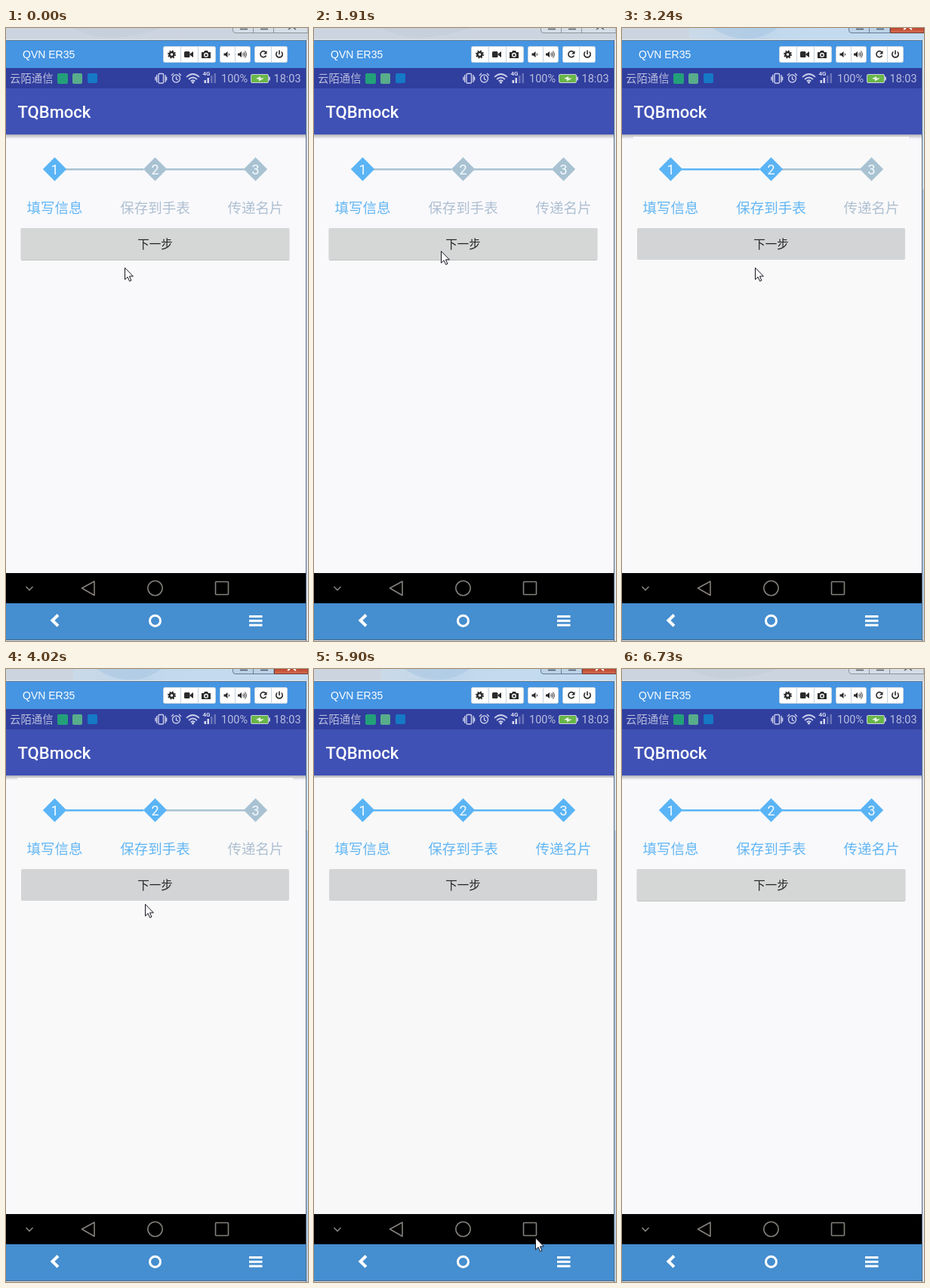
Write an HTML page that moves like this. It is 400 px wide and 812 px high and loops after 6.76 s.

```html
<!DOCTYPE html>
<html lang="zh">
<head>
<meta charset="utf-8">
<title>Step view</title>
<style>
html, body { margin: 0; width: 100%; height: 100%; overflow: hidden; background: #d0d9e4; }
svg { display: block; width: 100vw; height: 100vh; }
text { font-family: Roboto, "Noto Sans CJK SC", "Noto Sans CJK", sans-serif; }
.mid { text-anchor: middle; }
.line { fill: none; stroke: currentColor; }

/* every animation holds each pose until the next key */
.active, .flat, .plain, .step2, .step3, .lift, .press, .hover, #cursor {
  animation: 6760ms step-end infinite;
}
.active { animation-name: active; }
.flat { animation-name: flat; }
.plain { animation-name: plain; }
.step2 { animation-name: step2; }
.step3 { animation-name: step3; }
.lift { animation-name: lift; }
.press { animation-name: press; }
.hover { animation-name: hover; }
#cursor { animation-name: cursor; }

@keyframes active { 0%, 99.55% { opacity: 0 } 32.39% { opacity: 1 } }
@keyframes flat { 0%, 75.59% { opacity: 0 } 36.39% { opacity: 1 } }
@keyframes plain { 0%, 99.55% { opacity: 0 } 75.59% { opacity: 1 } }
@keyframes step2 { 0% { color: #a9c2d2; fill: #aebfd1 } 36.39%, 100% { color: #5ab4f5; fill: #62b6f4 } }
@keyframes step3 { 0% { color: #a9c2d2; fill: #aebfd1 } 71.59%, 100% { color: #5ab4f5; fill: #62b6f4 } }
@keyframes lift { 0%, 99.55% { opacity: 1 } 36.39% { opacity: 0 } }
@keyframes press { 0%, 40.38%, 73.37% { opacity: 0 } 36.39%, 71.59% { opacity: 1 } }
@keyframes hover { 0%, 91.71% { opacity: 0 } 89.49% { opacity: 1 } }
@keyframes cursor {
  0% { transform: translate(157px, 317px) }
  13.75% { transform: translate(159px, 309px) }
  15.53% { transform: translate(162px, 301px) }
  17.75% { transform: translate(163px, 301px) }
  26.47% { transform: translate(166px, 298px) }
  28.25% { transform: translate(168px, 295px) }
  32.39% { transform: translate(167px, 305px) }
  34.17% { transform: translate(162px, 350px) }
  36.39% { transform: translate(161px, 370px) }
  43.93% { transform: translate(164px, 350px) }
  46.15% { transform: translate(170px, 335px) }
  47.92% { transform: translate(176px, 317px) }
  49.7% { transform: translate(180px, 302px) }
  51.47% { transform: translate(182px, 293px) }
  57.69% { transform: translate(184px, 300px) }
  59.46% { transform: translate(184px, 311px) }
  61.68% { transform: translate(184px, 345px) }
  63.46% { transform: translate(184px, 368px) }
  83.28% { transform: translate(200px, 425px) }
  85.05% { transform: translate(270px, 606px) }
  87.27% { transform: translate(293px, 753px) }
  89.49% { transform: translate(300px, 790px) }
  91.71%, 100% { transform: translate(300px, 840px) }
}
</style>
</head>
<body>
<svg viewBox="0 0 400 812" preserveAspectRatio="none">
<defs>
  <linearGradient id="glass" x2="0" y2="1"><stop stop-color="#ccd5df"/><stop offset="1" stop-color="#d5dee8"/></linearGradient>
  <linearGradient id="sky" x2="1" y2="0">
    <stop stop-color="#cbdae8"/><stop offset=".3" stop-color="#bfd5ea"/><stop offset=".42" stop-color="#c3daee"/>
    <stop offset="1" stop-color="#c3dbf0"/>
  </linearGradient>
  <linearGradient id="red" x2="0" y2="1"><stop stop-color="#b73d25"/><stop offset="1" stop-color="#d77055"/></linearGradient>
  <linearGradient id="shade" x2="0" y2="1"><stop stop-color="#b0b1b5"/><stop offset="1" stop-color="#f9f9fc"/></linearGradient>
  <path id="gem" d="M0-15.700L15.700 0 0 15.700-15.700 0Z"/>
</defs>

<!-- window frame -->
<rect width="400" height="812" fill="url(#glass)"/>
<path d="M88 0Q120 17 155 12T205 0Z" fill="#c4ced9" opacity=".6"/>
<g fill="#d5dde6" stroke="#8b959f">
  <path d="M300.500-1V3Q300.500 6.500 304 6.500H400V-1M327.500 0V6.500M354.500 0V6.500"/>
</g>
<path d="M310 1.500H320M337 1.500H347M374 2L377 0M384 2L381 0" stroke="#59616a" stroke-width="1.500"/>
<rect x="398" y="16" width="2" height="796" fill="#dbe3ec"/>
<g class="active">
  <rect x="89" width="311" height="15" fill="url(#sky)"/>
  <path d="M120 0Q140 14 164 14T206 0Z" fill="#9fc0df" opacity=".45"/>
  <path d="M300.500-1V3Q300.500 6.500 304 6.500H355V-1M327.500 0V6.500" fill="#bcd2e7" stroke="#667d95"/>
  <path d="M355.500-1V6.500H400V-1" fill="url(#red)" stroke="#6d3b35"/>
  <path d="M310 1.500H320M337 1.500H347" stroke="#4d5b6b" stroke-width="1.500"/>
  <path d="M373 2L376 0M384 2L381 0" stroke="#fff" stroke-width="2"/>
  <rect x="398" y="15" width="2" height="199" fill="#d2e3f2"/>
  <rect x="398" y="214" width="2" height="598" fill="#b4cde4"/>
</g>
<rect y="15" width="398" height="1" fill="#dfe7ef"/>
<rect y="16" width="398" height="1" fill="#5f7890"/>
<rect x="397" y="16" width="1" height="796" fill="#566b80"/>

<!-- mirror toolbar -->
<rect y="17" width="397" height="36" fill="#4595e3"/>
<text x="22" y="40" font-size="14" fill="#fff" style="font-family:'Liberation Sans',sans-serif">QVN ER35</text>
<g fill="#fff" stroke="#c6d3df">
  <rect x="208.500" y="24.500" width="69" height="21" rx="2"/>
  <rect x="283.500" y="24.500" width="40" height="21" rx="2"/>
  <rect x="329.500" y="24.500" width="43" height="21" rx="2"/>
  <path d="M231.500 25V45M254.500 25V45M303.500 25V45M351.500 25V45"/>
</g>
<g fill="#2b2b2b" color="#2b2b2b">
  <circle class="line" cx="219.500" cy="35" r="3" stroke-width="2.400"/>
  <circle class="line" cx="219.500" cy="35" r="4.600" stroke-width="1.800" stroke-dasharray="1.800 1.813"/>
  <rect x="236" y="31" width="7.500" height="8" rx="1.500"/>
  <path d="M243.500 34.500L248 31V39L243.500 35.500Z"/>
  <path d="M259 32H262L263 30H267L268 32H271V40H259Z"/>
  <circle class="line" cx="265" cy="35.800" r="2.300" style="color:#fff" stroke-width="1.300"/>
  <path d="M288.500 33.500H290.500L293.500 31V39L290.500 36.500H288.500ZM307 33.500H309L312 31V39L309 36.500H307Z"/>
  <path class="line" d="M295 33.500Q296.500 35 295 36.500M313.500 33.500Q315 35 313.500 36.500M315 32Q317.500 35 315 38M316.500 30.500Q320 35 316.500 39.500"/>
  <path class="line" d="M344 32A4 4 0 1 0 344.500 36.500" stroke-width="1.600"/>
  <path d="M345.500 30V34.500H341Z"/>
  <path class="line" d="M359.300 31.500A4.200 4.200 0 1 0 364.700 31.500M362 29.500V35" stroke-width="1.600"/>
</g>

<!-- phone status bar -->
<rect y="53" width="397" height="27" fill="#303e9e"/>
<g fill="#b9bfde" color="#c9cee9">
  <text x="5" y="72" font-size="14.400">云陌通信</text>
  <rect x="68" y="60" width="14" height="14" rx="2" fill="#23a079"/>
  <rect x="88" y="60" width="13" height="14" rx="2" fill="#58ad8b"/>
  <rect x="108" y="60" width="13" height="13" rx="2" fill="#1579c6"/>
  <g class="line" stroke-width="1.400">
    <rect x="202" y="60.500" width="6.500" height="12.500" rx="1"/>
    <path d="M199.700 62V72M211 62V72M198 64.500V69.500M212.600 64.500V69.500"/>
    <circle cx="225.500" cy="67" r="5"/>
    <path d="M225.500 64V67.500L228 69M219 63L222 60M232 63L229 60"/>
    <path d="M239 65Q247.500 57 256 65M242 68Q247.500 63 253 68M244.700 70.500Q247.500 68 250.300 70.500" stroke-width="1.700"/>
  </g>
  <circle cx="247.500" cy="72" r="1.600" fill="#c9cee9"/>
  <text x="260.500" y="63" font-size="8" font-weight="700" fill="#d5d9ee">4G</text>
  <path d="M262.500 69H265V73H262.500ZM266.500 66H269V73H266.500Z" fill="#d5d9ee"/>
  <path d="M271 63H273.500V73H271ZM275.500 60H278V73H275.500Z" fill="#6973b7"/>
  <text x="285" y="72" font-size="14.500">100%</text>
  <rect x="324.500" y="61.500" width="23" height="11" rx="1.500" fill="#69b649" stroke="#cbd0e4"/>
  <path d="M348 64.500H350V69.500H348Z"/>
  <path d="M331 67L337 64V66.500H342L335 70.500V68Z" fill="#e8f2e4"/>
  <text x="354.500" y="72" font-size="14.500">18:03</text>
</g>

<!-- app -->
<rect y="141" width="397" height="581" fill="#f9f9fc"/>
<rect y="141" width="397" height="6" fill="url(#shade)"/>
<g class="flat">
  <rect x="15" y="144" width="365" height="578" fill="#f9f9f9"/>
</g>
<g class="plain">
  <rect y="144" width="397" height="578" fill="#f8f8f8"/>
</g>
<rect y="80" width="397" height="61" fill="#3f51b5"/>
<text x="15.500" y="119" font-size="22" font-weight="500" fill="#fff">TQBmock</text>

<g stroke="currentColor" stroke-width="2.400">
  <path class="step2" d="M79 187.200H182"/>
  <path class="step3" d="M212 187.200H316"/>
</g>
<use href="#gem" x="64.500" y="187" fill="#5ab4f5"/>
<g class="step2"><use href="#gem" x="197.500" y="187" style="fill:currentColor"/></g>
<g class="step3"><use href="#gem" x="330.500" y="187" style="fill:currentColor"/></g>
<g class="mid" font-size="18" fill="#f6fbff">
  <text x="64.500" y="194">1</text><text x="197.500" y="194">2</text><text x="330.500" y="194">3</text>
</g>
<g class="mid" font-size="18.500">
  <text x="64.500" y="244.500" fill="#62b6f4">填写信息</text>
  <text class="step2" x="197.500" y="244.500">保存到手表</text>
  <text class="step3" x="330.500" y="244.500">传递名片</text>
</g>

<g class="lift">
  <rect x="19" y="265" width="357" height="42" rx="2" fill="#e3e4e6"/>
  <rect x="20" y="306" width="355" height="2" rx="1" fill="#c3c5c6"/>
</g>
<rect x="20" y="265" width="355" height="42" rx="2" fill="#d3d4d5"/>
<rect class="lift" x="20" y="265" width="355" height="42" rx="2" fill="#d5d7d6"/>
<rect class="press" x="19" y="265" width="357" height="44" rx="4" fill="#cfd0d1"/>
<text class="mid" x="197.500" y="292" font-size="15.500" font-weight="500" fill="#242525">下一步</text>

<!-- navigation -->
<rect y="722" width="397" height="40" fill="#000"/>
<g class="line" color="#85817d" stroke-width="1.600">
  <path d="M26.500 740L31 744.500 35.500 740"/>
  <path d="M100.500 742L117 733V751.500Z" stroke-linejoin="round"/>
  <circle cx="197.500" cy="742" r="9.700"/>
  <rect x="277.500" y="733.500" width="17" height="17" rx="1"/>
</g>
<rect y="762" width="397" height="48" fill="#458ecf"/>
<rect class="hover" x="264" y="762" width="133" height="48" fill="#5a9fdc"/>
<g class="line" color="#fff" stroke-width="3">
  <path d="M69 777.500L61.500 784.700 69 792" stroke-width="4"/>
  <circle cx="197.500" cy="785.200" r="7"/>
  <path d="M322 779.500H339.500M322 785.200H339.500M322 791H339.500"/>
</g>
<rect y="810" width="398" height="1" fill="#50677f"/>

<g id="cursor">
  <path d="M.5.700V16.200L4.100 12.800 6.600 18.400 8.900 17.400 6.500 11.900H11.400Z" fill="#fff" stroke="#15151f"/>
</g>
</svg>
</body>
</html>
```
